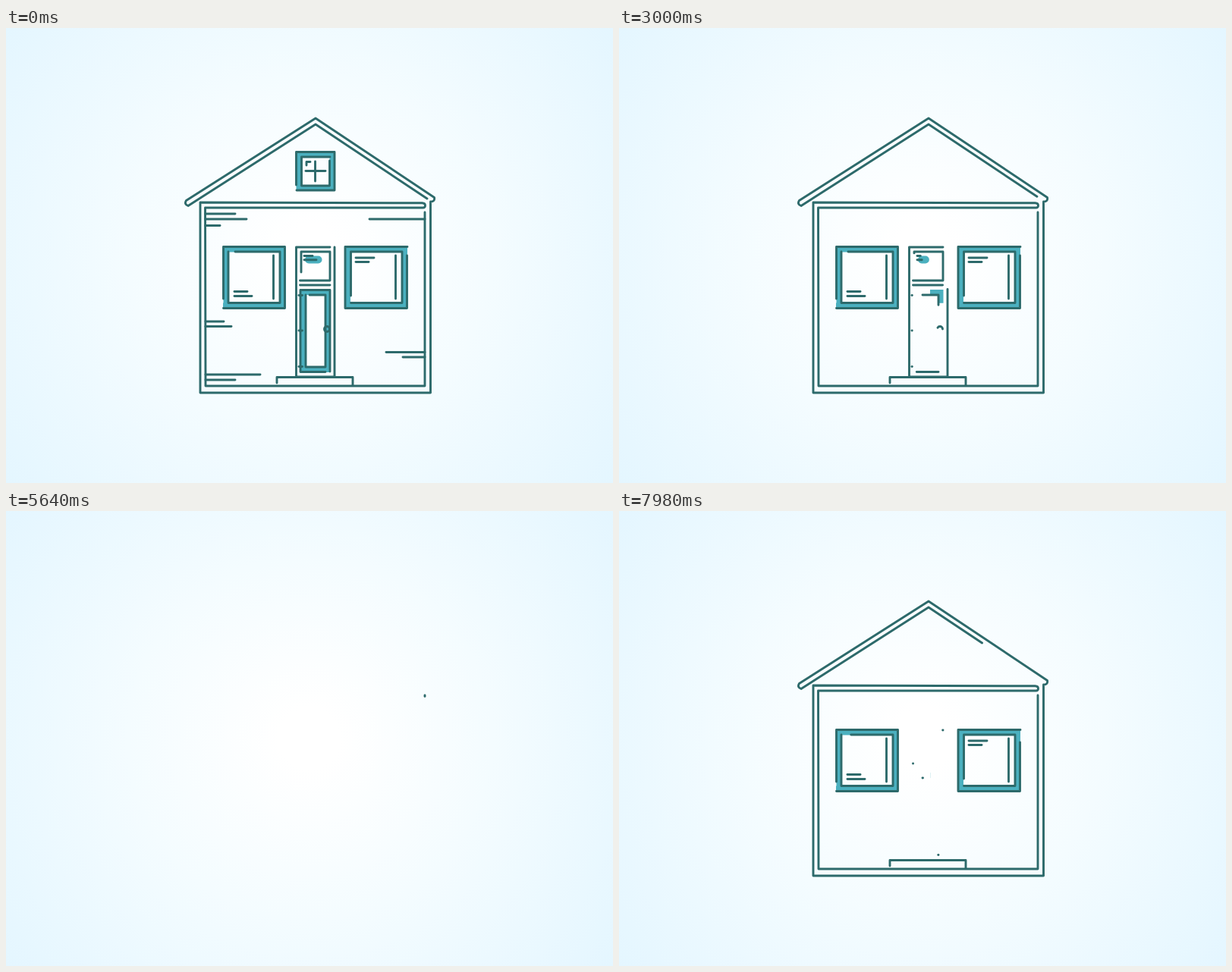
These frames come from a looping animation (800 by 600 pixels, 8 s). An HTML page:

```html
<!DOCTYPE html>
<html lang="en">
<head>
<meta charset="utf-8">
<title>House line drawing</title>
<style>
  html, body { margin: 0; width: 100%; height: 100%; overflow: hidden; }
  body { background: radial-gradient(circle 500px at 50% 50%, #fff 0, #fff 8%, #f4fcff 48%, #e4f6ff 100%); }
  svg { display: block; width: 100vw; height: 100vh; }
  path { fill: none; stroke-linejoin: round; }
  .line { stroke: #2d6a6b; stroke-width: 2.9; stroke-linecap: round; }
  .band { stroke: #4bb0bf; stroke-width: 7; stroke-linejoin: miter; }
  .pill { stroke: #4bb0bf; stroke-width: 10; stroke-linecap: round; }
</style>
</head>
<body>
<svg id="stage" viewBox="0 0 800 600"></svg>
<script>
const LOOP = 8000;
const TURN_FULL = 255;    // house complete, starts to undraw
const TURN_EMPTY = 5790;  // stage empty, starts to draw again

// [class, path, start, duration] on the drawing timeline, in ms
const strokes = [
  // colour bands
  ['band', 'M286 366H364V292H290V363', 900, 1270],
  ['band', 'M529 292H450.500V366H525.500V289', 1500, 640],
  ['band', 'M410 348.500H424V450.500H391.500V348.500H410', 2150, 1650],
  ['band', 'M433 166.500H386V211H430V169', 2800, 1140],
  ['pill', 'M399 305.500H411.500', 2500, 600],

  // walls and roof in one continuous line
  ['line', 'M552 243V472H263L262.500 237H549.500q3 0 3-3t-4-3.200L256 230V481H559.500V229' +
           'q6 0 5-5.500L408 119 237.500 227.500q-3 5 2.500 7L408 127 555 225', 135, 2940],
  ['line', 'M457 471V460.500H357V468', 1020, 1144],

  // left window
  ['line', 'M286.500 357V288.500H367.500V369.500H286.500M293 295V362.500H361V295H302', 705, 1830],
  ['line', 'M352.500 300V357', 1070, 530],
  ['line', 'M301 347.500H318', 1600, 450],
  ['line', 'M301 353.500H324', 1600, 450],

  // right window
  ['line', 'M454.500 353V295H522V362.500H454.500M529 288.500H447V369.500H528.500V300', 705, 1870],
  ['line', 'M513.500 300V357', 1600, 450],
  ['line', 'M461 303H485', 1600, 450],
  ['line', 'M461 308.500H478', 1600, 450],

  // door
  ['line', 'M427 289H382.500V460H433V289', 2160, 1050],
  ['line', 'M387.500 333H427V295H389V322', 2185, 1050],
  ['line', 'M387.500 339H427', 2250, 700],
  ['line', 'M400 352H421V447H395V352', 1980, 1970],
  ['line', 'M421 453.500H388V345.500H427V453', 2130, 1717],
  ['line', 'M393 300.500H404', 2500, 600],
  ['line', 'M393 305.800H409', 2500, 600],
  ['line', 'M386 352.500H390.500', 2600, 550],
  ['line', 'M386 399H390.500', 2600, 550],
  ['line', 'M386 446.500H390.500', 2600, 550],
  ['line', 'M426.500 397a3.500 3.500 0 1 0 -7 0a3.500 3.500 0 1 0 7 0', 2450, 700],

  // attic window
  ['line', 'M382.500 207V163.500H433V214H383', 2800, 1127],
  ['line', 'M426.500 175V208H389.500V170H427', 2800, 1127],
  ['line', 'M395 188.500H421', 3220, 1000],
  ['line', 'M407.500 176V202', 3220, 1000],
  ['line', 'M401 176.500H396V181', 3260, 1000],

  // siding
  ['line', 'M552 252H479', 3380, 1000],
  ['line', 'M263 245H302', 3500, 950],
  ['line', 'M263 252H317', 3600, 950],
  ['line', 'M263 260.500H282', 3700, 900],
  ['line', 'M263 387H287', 3800, 900],
  ['line', 'M263 393.500H297', 3900, 900],
  ['line', 'M552 427.500H501', 3950, 900],
  ['line', 'M552 434H523', 4000, 900],
  ['line', 'M263 457H335', 4050, 900],
  ['line', 'M263 464H302', 4240, 810],
];

const stage = document.getElementById('stage');

function addPath(cls, d) {
  const el = document.createElementNS('http://www.w3.org/2000/svg', 'path');
  el.setAttribute('class', cls);
  el.setAttribute('d', d);
  stage.append(el);
  return { el, length: el.getTotalLength() };
}

const items = strokes.map(([cls, d, start, duration]) => {
  const parts = d.match(/M[^M]+/g).map(sub => addPath(cls, sub));
  const total = parts.reduce((sum, part) => sum + part.length, 0);
  return { parts, total, start, duration };
});

function expoInOut(p) {
  if (p <= 0) return 0;
  if (p >= 1) return 1;
  return p < 0.5 ? 2 ** (20 * p - 10) / 2 : 1 - 2 ** (10 - 20 * p) / 2;
}

// Loop time to drawing time: finish drawing, undraw, draw again
function drawingTime(t) {
  if (t < TURN_FULL) return TURN_EMPTY - 2 * TURN_FULL + t;
  return Math.abs(t - TURN_EMPTY);
}

function render(t) {
  const now = drawingTime(t);
  for (const { parts, total, start, duration } of items) {
    let left = total * expoInOut((now - start) / duration);
    for (const { el, length } of parts) {
      const shown = Math.min(left, length);
      el.style.visibility = shown > 0 ? 'visible' : 'hidden';
      el.style.strokeDasharray = shown >= length - 0.01 ? 'none' : `${shown} ${length + 20}`;
      left = Math.max(0, left - length);
    }
  }
}

const origin = performance.now();
function tick() {
  render((performance.now() - origin) % LOOP);
  requestAnimationFrame(tick);
}
tick();
</script>
</body>
</html>
```
